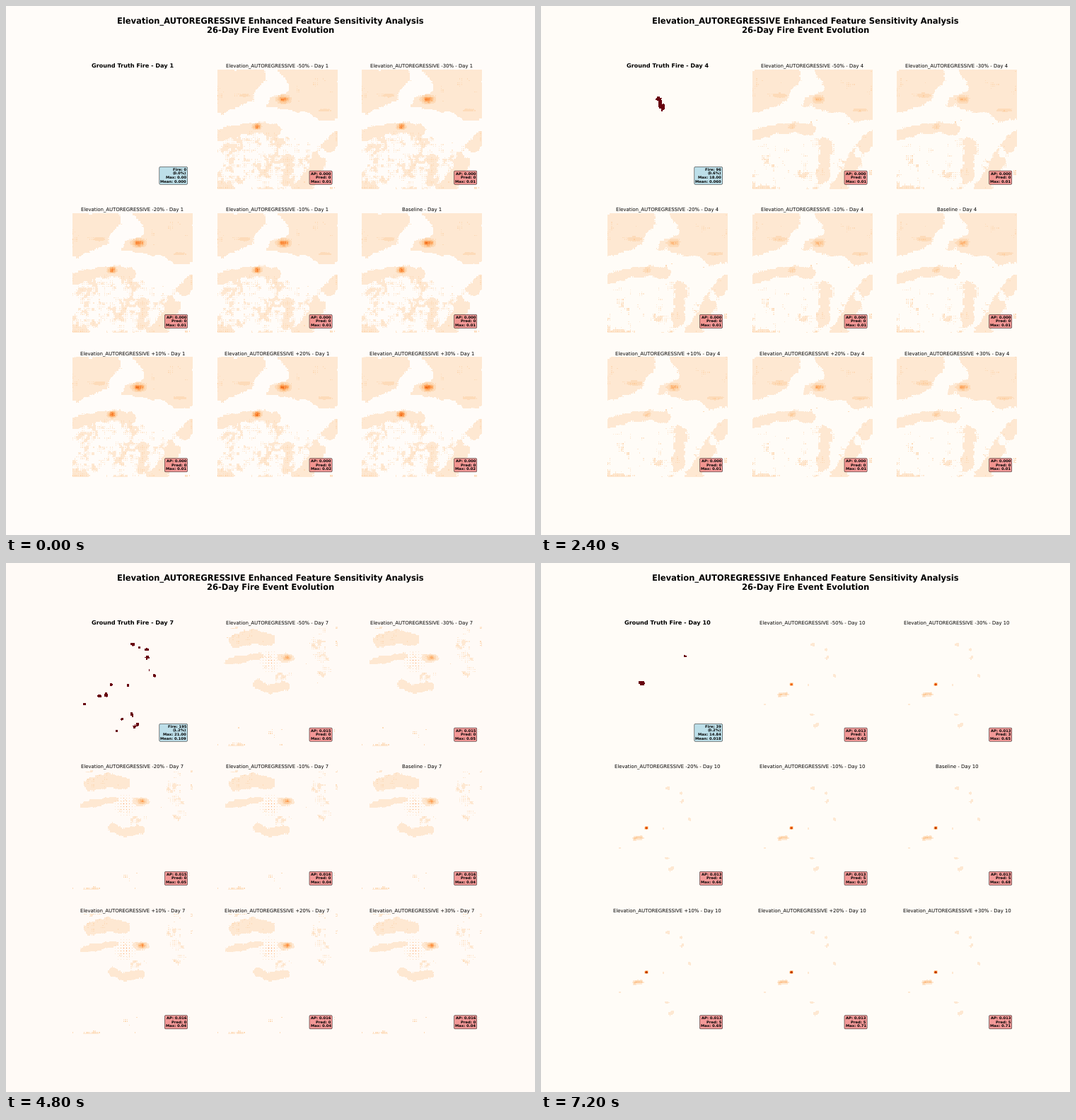
Write a matplotlib script that moves like this. It is 748 px wide and 748 px high and loops after 8 s.

```python
import numpy as np
import matplotlib.pyplot as plt
from matplotlib.animation import FuncAnimation
from matplotlib.colors import to_rgb
from matplotlib.path import Path

plt.rcParams["text.hinting"] = "none"

N = 128
SIDE = 169.4          # panel side in pixels; shapes use pixel units
PT = 17 / 18          # type was sized for an 18 inch sheet
SHIFTS = (-50, -30, -20, -10, 0, 10, 20, 30)

rows, cols = np.mgrid[0:N, 0:N]
X = (cols + 0.5) * SIDE / N
Y = (rows + 0.5) * SIDE / N
DOTS = (rows % 2 == 0) & (cols % 2 == 0)
WIDE_DOTS = (rows % 3 == 0) & (cols % 3 == 0)

EDGES = (0.065, 0.15, 0.22, 0.3, 0.4, 0.5, 0.6, 0.7, 0.8, 0.9)
MIDDLES = (np.array(EDGES) + np.append(EDGES[1:], 1)) / 2
TONES = plt.cm.Oranges(MIDDLES)[:, :3]
FIRE_RED = np.array(to_rgb("#67000d"))


def blur(a, sigma):
    r = int(3 * sigma) + 1
    k = np.exp(-0.5 * (np.arange(-r, r + 1) / sigma) ** 2)
    k /= k.sum()
    a = np.pad(a, r, mode="edge")
    for axis in (0, 1):
        a = np.apply_along_axis(np.convolve, axis, a, k, mode="valid")
    return a


def noise(seed, sigma):
    n = blur(np.random.default_rng(seed).normal(size=(N, N)), sigma)
    return (n - n.mean()) / n.std()


def cloud(seed):
    return 0.65 * noise(seed, 4) + 0.6 * noise(seed + 1, 1.4)


GRAIN = noise(4, 0.8)
CLOUDS = cloud(7), cloud(21)


def inside(*points):
    pts = np.column_stack([X.ravel(), Y.ravel()])
    return Path(points).contains_points(pts).reshape(N, N)


def reach(*points):
    """Distance of every cell from a polyline."""
    best = np.full((N, N), np.inf)
    for (x1, y1), (x2, y2) in zip(points, points[1:] or points):
        dx, dy = x2 - x1, y2 - y1
        t = ((X - x1) * dx + (Y - y1) * dy) / max(dx * dx + dy * dy, 1e-9)
        t = np.clip(t, 0, 1)
        best = np.minimum(best, np.hypot(X - x1 - t * dx, Y - y1 - t * dy))
    return best


def glow(x, y, rx, ry, amp):
    return amp * np.exp(-((X - x) / rx) ** 2 - ((Y - y) / ry) ** 2)


# Terrain shared by the early days
WEST = inside((0, 0), (66, 0), (68, 14), (54, 30), (48, 46), (30, 53), (6, 62), (0, 62))
EAST = inside((84, 0), (170, 0), (170, 72), (146, 74), (128, 62), (108, 60),
              (68, 53), (76, 38), (102, 32), (100, 20))
BAND = reach((0, 95), (28, 86), (58, 82), (84, 85)) < 7
HOLE = np.hypot((X - 148) / 5, (Y - 117) / 10) < 1
RING = (reach((168, 98), (148, 117), (136, 146), (120, 168)) < 9) & ~HOLE
COLUMN = reach((102, 106), (101, 150)) < 9
LOWLAND = (Y > 94) & (X < 135)
PLUME = [reach((26, 22), (50, 14), (72, 20)) < 9, reach((12, 51), (60, 42)) < 4.5,
         reach((56, 82), (74, 90), (96, 85)) < 6, reach((90, 45), (106, 45)) < 5]
HAZE = [reach((146, 12), (142, 40), (150, 60)) < 11, reach((75, 46), (75, 54)) < 11,
        reach((84, 72), (100, 70)) < 5, reach((8, 96), (20, 93)) < 5]


def land(day):
    if day == 7:
        f = np.maximum(np.any(PLUME, axis=0), 0.36 * np.any(HAZE, axis=0))
        return blur(f, 1.6)
    f = (WEST | EAST | BAND | RING).astype(float)
    f = np.maximum(f, COLUMN * min(1, 0.3 + 0.13 * day))
    f = np.maximum(f, LOWLAND * max(0, 0.42 - 0.06 * day))
    return blur(f, 2.2)


def heat(day):
    if day < 7:
        ridge = 0.07 + 0.012 * day
        return (glow(93, 43, 8, 5, 0.5 - 0.065 * day) + glow(38, 37, 12, 4, ridge)
                + glow(56, 81, 5, 4, max(0, 0.58 - 0.11 * day))
                + glow(152, 58, 12, 3, ridge))
    if day == 7:
        return glow(98, 45, 5, 3, 0.36) + WIDE_DOTS * glow(74, 50, 10, 11, 0.55)
    if day == 8:
        return (glow(20, 109, 3, 2, 0.5) + glow(24, 107, 3, 2, 0.6)
                + glow(108, 141, 2, 1.5, 0.4) + glow(72, 82, 6, 3, 0.1))
    return glow(55, 82, 2.2, 1.8, 0.08 * day) + glow(42, 96, 6, 2, 0.32)


# Each front's corners are the places that keep smouldering
FRONTS = [((85, 26), (94, 30), (104, 33), (104, 45), (108, 62), (115, 70)),
          ((78, 84), (55, 83), (48, 97), (38, 99), (17, 110)),
          ((84, 124), (70, 132), (63, 149)), ((88, 142), (92, 139))]
LINES = np.min([reach(*f) for f in FRONTS], axis=0)
CORNERS = np.min([reach(p) for f in FRONTS for p in f], axis=0)


def outbreak():
    """First large burn: a tall core, a ragged flank and streaks to the south."""
    d = reach((93, 39), (94, 77)) - 9
    for k in range(5):
        d = np.minimum(d, reach((66, 39 + 8 * k), (82, 37 + 8 * k)) - 2.2 + 0.8 * CLOUDS[0])
    for k in range(3):
        d = np.minimum(d, reach((75, 99 + 8 * k), (90, 89 + 8 * k)) - 1.6)
        d = np.minimum(d, reach((74 + 5 * k, 150 - 2 * k), (88 + 4 * k, 136 - k)) - 1.5)
        d = np.minimum(d, reach((106, 58 + 12 * k), (110, 62 + 11 * k)) - 1)
        d = np.minimum(d, reach((104, 104 + 13 * k), (106, 112 + 14 * k)) - 1)
    return np.minimum(d, reach((20, 109), (25, 107)) - 2.2) + GRAIN < 0


def burnt(day):
    if day == 4:
        return reach((72, 42), (78, 56)) + GRAIN < 3
    if day == 5:
        return outbreak()
    if day == 6:
        return LINES + 1.2 * CLOUDS[1] + 0.8 * GRAIN < 2.2
    if day == 7:
        return CORNERS + 0.7 * CLOUDS[1] + 0.3 * GRAIN < 2.3
    if day == 8:
        return (CORNERS + 0.5 * CLOUDS[1] < 1.4) & (Y < 100)
    if day > 8:
        size = day - 7.4
        return (reach((46, 80), (50, 81)) < size) | (reach((108, 42), (110, 43)) < size / 2)
    return np.zeros((N, N), bool)


def risk(day, shift):
    hot = heat(day) * (1 + shift / 300) * (0.85 + 0.25 * DOTS + 0.08 * GRAIN)
    if day >= 8:
        # Later forecasts echo the burn of three days before
        w = blur(burnt(day - 3).astype(float), 1.3)
        halo = 0.62 * w * (1 - w) if day == 8 else 0.2 * w
        return halo * (0.85 + 0.2 * GRAIN) + hot
    turn = 0.3 * day
    c = np.cos(turn) * CLOUDS[0] + np.sin(turn) * CLOUDS[1]
    covered = land(day) + 0.17 * c + 0.14 * DOTS - 0.0005 * shift > 0.5
    return 0.02 + covered * (0.085 + 0.03 * np.maximum(c, 0) * DOTS) + hot


FIRE_STATS = {4: (96, 0.6, 18, 0.06), 5: (1348, 8.2, 20, 1.024), 6: (766, 4.7, 20, 0.428),
              7: (195, 1.2, 21, 0.109), 8: (37, 0.2, 21, 0.017), 9: (12, 0.1, 12, 0.006),
              10: (39, 0.2, 14.84, 0.018)}
PEAKS = (0.62, 0.65, 0.66, 0.67, 0.68, 0.69, 0.71, 0.71)
HITS = (1, 3, 4, 5, 5, 5, 5, 5)


def fire_note(day):
    n, pct, top, mean = FIRE_STATS.get(day, (0, 0, 0, 0))
    return f"Fire: {n}\n({pct:.1f}%)\nMax: {top:.2f}\nMean: {mean:.3f}"


def risk_note(day, i):
    shift = SHIFTS[i]
    ap = {5: 0.012 + 0.001 * (shift > 0), 6: 0.016, 7: 0.015 + 0.001 * (shift > -20),
          8: 0.014, 9: 0.014, 10: 0.013}.get(day, 0)
    peak = {1: 0.01 + 0.01 * (shift > 10), 7: 0.05 - 0.01 * (shift > -20),
            8: 0.16 + 0.0006 * shift, 9: PEAKS[i] / 2, 10: PEAKS[i]}.get(day, 0.01)
    pred = HITS[i] if day == 10 else 0
    return f"AP: {ap:.3f}\nPred: {pred}\nMax: {peak:.2f}"


fig, axes = plt.subplots(3, 3, figsize=(17, 17), dpi=44)
fig.suptitle("Elevation_AUTOREGRESSIVE Enhanced Feature Sensitivity Analysis\n"
             "26-Day Fire Event Evolution", fontsize=20 * PT, fontweight="bold")
axes = axes.ravel()
images, notes = [], []
for k, ax in enumerate(axes):
    ax.axis("off")
    images.append(ax.imshow(np.ones((N, N, 3)), interpolation="nearest"))
    box = dict(boxstyle="round,pad=0.3", facecolor="lightcoral" if k else "lightblue",
               alpha=0.8, linewidth=PT)
    notes.append(ax.text(0.95, 0.05, "", transform=ax.transAxes, ha="right", va="bottom",
                         fontsize=9 * PT, fontweight="bold", bbox=box))


def update(frame):
    day = frame + 1
    paper = {1: "#fffcf9", 7: "#fffaf6"}.get(day, "#fffcf7")
    fig.set_facecolor(paper)
    base = np.array(to_rgb(paper))
    palette = np.vstack([base, TONES])

    images[0].set_data(np.where(burnt(day)[..., None], FIRE_RED, base))
    notes[0].set_text(fire_note(day))
    axes[0].set_title(f"Ground Truth Fire - Day {day}", fontsize=14 * PT,
                      fontweight="bold", pad=6 * PT)

    for i, shift in enumerate(SHIFTS):
        name = f"Elevation_AUTOREGRESSIVE {shift:+d}%" if shift else "Baseline"
        images[i + 1].set_data(palette[np.digitize(risk(day, shift), EDGES)])
        notes[i + 1].set_text(risk_note(day, i))
        axes[i + 1].set_title(f"{name} - Day {day}", fontsize=12 * PT, pad=6 * PT)
    return images + notes


anim = FuncAnimation(fig, update, frames=10, interval=800, repeat=True)
plt.show()
```
